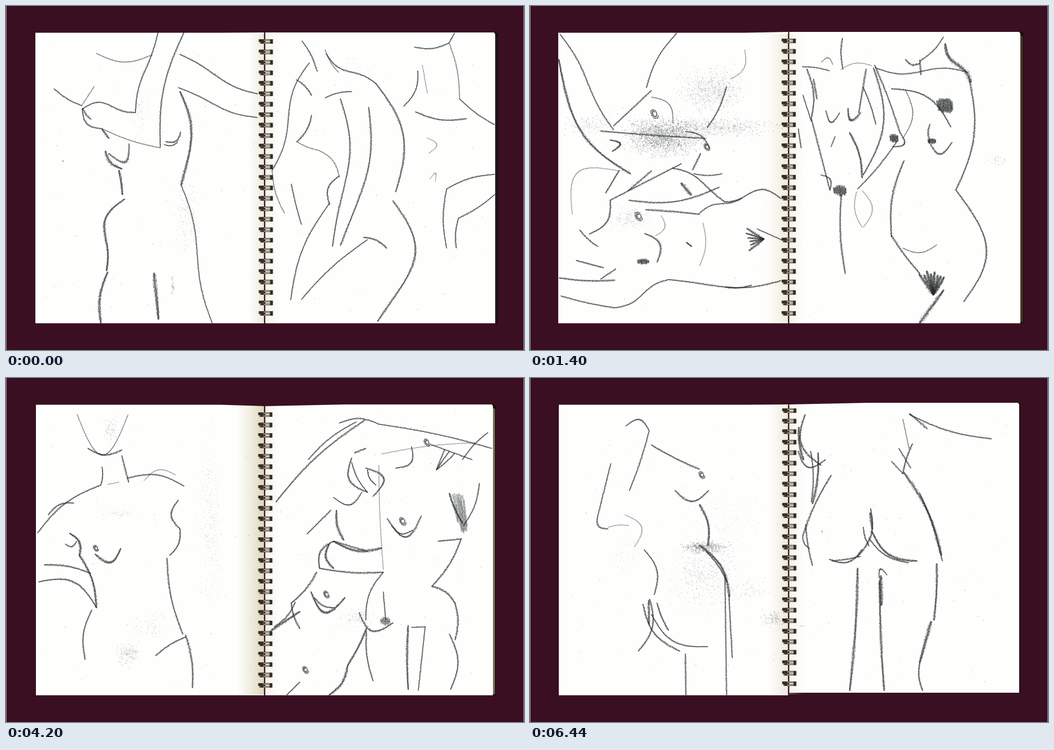
An HTML page with a canvas that plays this animation: 917x611 px, repeating every 7 s.

```html
<!DOCTYPE html>
<html lang="en">
<head>
<meta charset="utf-8">
<title>Sketchbook</title>
<style>
html, body { margin: 0; width: 100%; height: 100%; overflow: hidden; background: #3a0f22; }
canvas { display: block; width: 917px; height: 611px; }
</style>
</head>
<body>
<canvas id="stage" width="917" height="611"></canvas>
<script>
const W = 917, H = 611, HOLD = 1400, LOOP = 27;
const { PI, sin, cos, hypot } = Math;
let g, seed;

function rnd() {
  seed = (Math.imul(seed, 1664525) + 1013904223) >>> 0;
  return seed / 4294967296;
}
const spread = () => (rnd() + rnd() + rnd()) / 1.5 - 1;

// Points from one place to another: bow bulges clockwise, sway adds an S
function curve(x0, y0, x1, y1, bow = 0, sway = 0) {
  const dx = x1 - x0, dy = y1 - y0, len = hypot(dx, dy);
  const n = Math.ceil(len * 2 + Math.abs(bow) * 3);
  return Array.from({ length: n + 1 }, (_, i) => {
    const t = i / n, off = (bow * sin(PI * t) + sway * sin(2 * PI * t)) / len;
    return [x0 + dx * t - dy * off, y0 + dy * t + dx * off];
  });
}

// Pencil line: soft core with grain, pressure drifting along it
function pencil(pts, w, tone = 0.85) {
  const last = pts.length, phase = rnd() * 6;
  g.strokeStyle = g.fillStyle = "#2b3131";
  g.lineCap = g.lineJoin = "round";
  g.globalAlpha = tone * 0.55;
  g.lineWidth = w * 0.7;
  g.beginPath();
  pts.forEach(p => g.lineTo(...p));
  g.stroke();
  g.globalAlpha = tone * 0.5;
  pts.forEach(([x, y], i) => {
    const taper = Math.min(1, 0.4 + Math.min(i, last - i) / 24);
    const r = w * 0.65 * taper * (1 + 0.25 * sin(i / 35 + phase));
    for (let k = 0; k < w * 0.7; k++)
      g.fillRect(x + (rnd() * 2 - 1) * r - 0.45, y + (rnd() * 2 - 1) * r - 0.45, 0.9, 0.9);
  });
  g.globalAlpha = 1;
}

function arc(x0, y0, x1, y1, bow, w = 1.6, sway = 0) {
  pencil(curve(x0, y0, x1, y1, bow, sway), w, w < 1.3 ? 0.55 : 0.85);
}

// Small uneven spiral
function knot(x, y, r) {
  const pts = Array.from({ length: r * 14 }, (_, i) => {
    const a = i / r * 0.8, q = r * (1 - i / r / 22);
    return [x + q * 0.8 * cos(a), y + q * sin(a + 0.4)];
  });
  pencil(pts, 1.7, 0.75);
}

// Dark zigzag filling an ellipse
function scrub(x, y, rx, ry, tone = 0.7) {
  const n = Math.ceil(rx * 0.7), pts = [];
  for (let i = 0; i <= n; i++) {
    const u = i / n * 2 - 1, h = ry * (0.55 + 0.45 * cos(u * 1.5)) * (0.8 + rnd() * 0.4);
    const cx = x + u * rx, lean = h * 0.25;
    pts.push(...curve(cx - lean, y - h, cx + lean, y + h), ...curve(cx + lean, y + h, cx + 1, y - h));
  }
  pencil(pts, 2.2, tone);
}

// Strokes spreading from a point between two angles
function fan(x, y, r, from, to, n, w) {
  for (let i = 0; i < n; i++) {
    const a = (from + (to - from) * i / (n - 1)) * PI / 180, q = r * (0.75 + rnd() * 0.35);
    arc(x + q * cos(a), y + q * sin(a), x, y, spread() * 2, w);
  }
}

function grain(x, y, tone) {
  const s = 0.7 + rnd();
  g.globalAlpha = tone * (0.4 + rnd() * 0.6);
  g.fillRect(x, y, s, s);
}

function dust(x, y, rx, ry, n, tone = 0.3) {
  g.fillStyle = "#4a5150";
  for (let i = 0; i < n; i++) grain(x + spread() * rx, y + spread() * ry, tone);
  g.globalAlpha = 1;
}

// Clumpy graphite rubbed along a curve
function rub(x0, y0, x1, y1, bow, w, density) {
  g.fillStyle = "#59605c";
  curve(x0, y0, x1, y1, bow).forEach(([x, y], i) => {
    const d = density * (1 + 0.5 * sin(i / 17) * sin(i / 41));
    for (let k = rnd() + d; k >= 1; k--) grain(x + spread() * w, y + spread() * w, 0.45);
  });
  g.globalAlpha = 1;
}

function specks(n) {
  for (let i = 0; i < n; i++) dust(65 + rnd() * 780, 60 + rnd() * 490, 2, 2, 1, 0.35);
}

function poly(color, ...xy) {
  g.fillStyle = color;
  g.beginPath();
  for (let i = 0; i < xy.length; i += 2) g.lineTo(xy[i], xy[i + 1]);
  g.fill();
}

function shade(x0, x1, color) {
  const s = g.createLinearGradient(x0, 0, x1, 0);
  s.addColorStop(0, "rgba(225,218,190,0)");
  s.addColorStop(1, color);
  g.fillStyle = s;
  g.fillRect(Math.min(x0, x1), 50, Math.abs(x1 - x0), 512);
}

function book({ left = 52, right, edge, fold = 47, top = 47, foot = 563.5, tint, dark = 0.45, gutter = 28 }) {
  poly("#17100f", right - 2, top, edge - 2, top, edge, top + 3, edge, foot, right - 2, foot);
  poly(tint, right, top + 6, edge - 1.5, top + 8, edge - 1.5, foot - 2, right, foot - 2);
  poly("#fefefd", left, 47.5, 380, 47.5, 457, fold, 457, 563.5, left, 563.5);
  poly("#fefefd", 459, fold, 600, top, right - 2, top, right, top + 3, right, foot, 459, foot);
  shade(457 - gutter, 457, `rgba(216,207,174,${dark})`);
  shade(484, 459, "rgba(224,216,188,.3)");
}

function coils(x, y0, y1) {
  const bar = (color, dx, y, w, h) => { g.fillStyle = color; g.fillRect(x + dx, y, w, h); };
  bar("#3a1722", 456.7 - x, 49, 2, 514);
  for (let i = 0; i < LOOP; i++) {
    const y = y0 + (y1 - y0) * i / (LOOP - 1);
    bar("#2f2b24", 0, y - 4, 10, 5);
    bar("#6e6853", 2, y + 1, 8, 3);
    bar("#2f2b24", 20, y - 4, 5, 8);
    for (const dy of [-2.5, 2.5]) {
      bar("#37322a", 4, y + dy - 1.5, 19, 3);
      bar("#cfc8ae", 9, y + dy - 0.6, 11, 1.3);
    }
  }
}

function standing() {
  book({ right: 866, edge: 871, tint: "#21191b" });
  // raised arms
  arc(160, 84, 258, 87, 14, 1.4);
  arc(269, 47, 229, 189, 4, 1.8, -3);
  arc(229, 189, 135, 183, 10, 1.8, -6);
  arc(315, 47, 273, 251, 15, 1.8);
  arc(135, 182, 170, 218, 13);
  arc(170, 218, 273, 252, 4, 1.4);
  arc(85, 147, 134, 177, 3);
  arc(134, 177, 156, 143, 0, 1.3);
  arc(136, 182, 150, 201, 2, 2.4);
  arc(308, 86, 445, 156, 5, 2, -3.5);
  arc(305, 145, 445, 198, 6, 1.6, -3);
  // torso
  arc(308, 152, 310, 318, -19, 3.4, -2);
  arc(310, 318, 365, 563, -1, 1.5, -6);
  arc(283, 241, 309, 224, 9, 2.4);
  arc(280, 246, 304, 242, 4);
  arc(170, 219, 182, 235, 0, 3);
  arc(176, 258, 205, 289, 7, 3.6);
  arc(182, 262, 218, 245, 26, 2.6);
  arc(200, 292, 206, 335, -1, 3.8);
  arc(210, 343, 178, 470, 20, 3, 8);
  arc(180, 473, 168, 563, 8, 3.6);
  arc(262, 475, 270, 556, 0, 4.6);
  dust(294, 495, 4, 25, 60);
  dust(320, 375, 30, 80, 220, 0.22);
  dust(235, 180, 25, 60, 100, 0.2);
  dust(100, 275, 1.5, 1.5, 14);

  // seated back
  arc(524, 62, 551, 116, -3);
  arc(565, 78, 589, 118, 3, 1.3);
  arc(567, 85, 655, 138, 6, 2, 5);
  arc(655, 138, 690, 330, -31, 2.6);
  arc(537, 101, 471, 292, 4, 1.5, 8);
  arc(471, 292, 493, 368, 5, 1.4);
  arc(514, 131, 541, 159, -3, 2);
  arc(565, 163, 612, 152, -3);
  arc(592, 165, 578, 427, -19, 2, -6);
  arc(642, 180, 592, 425, -20, 2.4, -3);
  arc(541, 194, 515, 241, -5, 2.2);
  arc(515, 241, 552, 256, 2, 1.4);
  arc(553, 256, 590, 304, -9, 1.4);
  arc(590, 302, 573, 353, 12, 2);
  arc(505, 316, 523, 388, 1);
  arc(573, 350, 504, 522, 14, 1.5);
  arc(523, 521, 640, 415, -6);
  arc(633, 411, 674, 430, -5, 2.6);
  arc(685, 346, 658, 560, -49, 2.8, -7);
  // neck and knee studies
  arc(723, 73, 784, 66, 6);
  arc(784, 66, 794, 48);
  arc(785, 67, 803, 165, -5, 1.4);
  arc(803, 165, 865, 211, 3, 1.5);
  arc(729, 115, 704, 178, -9);
  arc(737, 105, 746, 155, 0, 1.2);
  arc(725, 188, 815, 200, 8, 2);
  arc(745, 234, 748, 262, -16, 1);
  arc(750, 308, 760, 312, -14, 1);
  arc(865, 299, 780, 325, 6);
  arc(780, 325, 780, 430, 6);
  arc(865, 335, 801, 377, -3);
  arc(801, 377, 797, 430, 3, 1.8);
  specks(130);
  coils(447.5, 63, 546);
}

function reclining() {
  book({ left: 50, right: 868, edge: 874, tint: "#4a3527", fold: 46, top: 46, gutter: 40 });
  dust(235, 232, 90, 45, 2400, 0.42);
  dust(320, 150, 75, 55, 900);
  dust(330, 215, 140, 22, 800, 0.35);
  dust(105, 210, 60, 25, 250, 0.25);
  dust(180, 375, 55, 30, 300, 0.2);
  // upper figure
  arc(53, 50, 148, 220, -1, 1.9, -4);
  arc(51, 95, 178, 298, 34, 3, -2);
  arc(260, 48, 206, 145, 8);
  arc(148, 213, 215, 150, 0, 2.2);
  arc(215, 162, 253, 208, -16, 1.4);
  knot(220, 191, 9);
  arc(380, 78, 355, 130, -13, 1.2);
  arc(348, 143, 314, 216, -4, 2.2);
  arc(125, 222, 310, 235, 1, 2.4);
  arc(275, 223, 318, 252, -9);
  knot(313, 250, 7);
  arc(142, 238, 146, 258, -16, 3);
  arc(302, 262, 288, 291, 0, 2.8);
  // lower figure
  arc(75, 370, 158, 293, -48, 1.2);
  arc(158, 292, 134, 332, 0, 2.7);
  arc(174, 328, 215, 293, 0, 2.6);
  arc(268, 280, 142, 345, 0, 2.2);
  arc(142, 345, 105, 405, -15, 2.2);
  arc(252, 288, 345, 348, -8, 2.2, -3);
  arc(268, 315, 285, 335, 0, 5);
  arc(175, 345, 335, 322, 14, 2.2);
  arc(290, 298, 340, 298, 3);
  arc(300, 368, 380, 338, -2, 1.8, -4);
  arc(380, 338, 444, 342, -14, 1.8);
  arc(345, 348, 375, 341, 2, 2.6);
  arc(205, 362, 300, 370, -1, 2.7);
  knot(192, 373, 9);
  arc(232, 372, 222, 408, -12, 1.2);
  arc(88, 398, 120, 427, 2, 2);
  arc(203, 404, 225, 455, -17, 2.6);
  scrub(200, 454, 9, 4);
  arc(306, 385, 300, 462, -8, 1.1);
  arc(277, 420, 286, 427, 0, 3.2);
  arc(82, 452, 130, 465, 0, 2.6);
  arc(52, 483, 150, 487, 3, 2.6);
  arc(125, 485, 152, 467, 0, 2);
  arc(55, 515, 150, 536, 2, 1.9);
  arc(150, 536, 245, 486, 2, 1.9, 5);
  arc(245, 486, 444, 488, 12, 1.9, -3);
  arc(345, 499, 392, 496, 3, 2.4);
  fan(414, 414, 33, 142, 212, 6, 3.2);
  arc(402, 396, 447, 416);

  // front view
  arc(482, 108, 530, 115, -2);
  arc(553, 57, 554, 112, 3, 2);
  arc(516, 100, 536, 104, -10, 1.3);
  arc(550, 113, 605, 106, -8, 1.2);
  arc(490, 112, 498, 200, -8, 2.4);
  arc(498, 200, 531, 327, 0, 2.2);
  arc(483, 158, 498, 205);
  arc(475, 218, 480, 252, 0, 2);
  arc(502, 130, 508, 165, 0, 2.8);
  arc(595, 112, 582, 190, 0, 2.6);
  arc(590, 145, 612, 210, -2, 2);
  arc(608, 110, 590, 300, -27, 2.4);
  arc(524, 186, 548, 190, 19, 2.2);
  arc(563, 182, 585, 190, 18, 3);
  arc(566, 225, 588, 305, -6, 3);
  arc(540, 232, 533, 250);
  scrub(548, 328, 10, 9);
  arc(551, 335, 558, 475, 5, 2.6);
  arc(578, 330, 588, 393, 8, 1.2);
  arc(588, 328, 590, 393, -17, 1.2);
  arc(580, 325, 650, 240, 3, 1.8);
  arc(515, 300, 531, 327, -10);
  // side view
  arc(665, 95, 690, 102, 6, 2.6);
  arc(690, 96, 692, 122, 0, 2.4);
  arc(690, 98, 732, 55, 4);
  arc(735, 68, 780, 135, 3, 5.5, 5);
  arc(612, 110, 775, 118, 2, 1.8, 7);
  arc(640, 147, 745, 215, -22, 2.2);
  scrub(734, 177, 12, 13);
  arc(778, 130, 754, 327, -20, 2.4);
  arc(754, 327, 768, 525, -46, 2.2, 3);
  arc(610, 105, 655, 225, -2, 2.2);
  scrub(644, 235, 6, 7);
  arc(655, 225, 642, 250, -16, 2.2);
  arc(665, 150, 660, 235, -15, 1.4);
  arc(706, 240, 747, 242, 22, 2.4);
  arc(708, 210, 708, 240, 3, 2.4);
  scrub(711, 240, 6, 4);
  arc(662, 275, 640, 410, 10, 2.8);
  arc(640, 408, 690, 475, 2, 2.8);
  arc(660, 430, 720, 424, 11, 1.4);
  fan(714, 512, 41, 235, 302, 8, 5);
  arc(732, 505, 690, 563, 0, 4.5);
  dust(830, 275, 30, 12, 40);
  specks(60);
  coils(445.5, 62, 546);
}

function rubbed() {
  book({ right: 867, edge: 873, tint: "#57402c", fold: 48 });
  rub(245, 95, 440, 95, -22, 26, 4);
  rub(235, 110, 248, 430, 14, 22, 3);
  rub(410, 115, 352, 215, 22, 18, 4);
  rub(250, 150, 345, 155, 38, 18, 3);
  rub(350, 150, 350, 240, -10, 13, 3);
  rub(368, 230, 365, 450, -22, 15, 4);
  rub(262, 250, 365, 255, 28, 16, 3);
  rub(296, 300, 356, 296, 20, 10, 8);
  rub(318, 320, 326, 500, 2, 12, 4);
  rub(318, 490, 328, 540, 0, 22, 4);
  dust(310, 280, 100, 250, 1300, 0.2);
  scrub(259, 222, 23, 35, 0.4);
  scrub(183, 255, 20, 34, 0.4);
  // crouched figure
  arc(148, 232, 268, 240, -5, 2.2);
  arc(185, 246, 268, 248, 0, 2.2);
  arc(148, 232, 98, 325, -5, 2.6);
  arc(152, 236, 118, 318, -8, 1.8);
  arc(140, 272, 110, 307, 33, 2.4);
  arc(158, 236, 190, 298, 5, 2.2);
  arc(98, 308, 190, 298, -13, 2.4);
  arc(190, 298, 180, 337, -11, 2.6);
  arc(182, 337, 75, 335, -15, 2.6);
  arc(125, 290, 185, 298, -6, 2.8);
  scrub(67, 339, 10, 12, 0.95);
  arc(72, 325, 102, 322, -13);
  arc(112, 315, 134, 328);
  // small bent figure
  arc(90, 435, 215, 460, -30, 1.4);
  arc(95, 447, 207, 460, -26, 1.4);
  arc(100, 450, 112, 507, 12, 1.4);
  arc(112, 507, 213, 485, 9, 1.4);
  arc(115, 485, 213, 480, 8, 1.4);
  arc(145, 463, 207, 458, 0, 1.4);
  scrub(159, 462, 6, 8, 0.95);
  for (let i = 0; i < 6; i++) knot(72 + i * 11, 467 + 9 * sin(i * 2.3), 5 + i % 3);
  arc(180, 420, 225, 442, 0, 1.1);

  // lying figure
  arc(540, 172, 505, 150, -17, 3);
  arc(505, 150, 610, 97, 4, 3);
  arc(610, 97, 637, 105, -6, 3);
  arc(637, 105, 545, 172, -5, 3.4);
  arc(520, 140, 618, 104, 6, 1.5);
  arc(506, 155, 508, 196, -4, 2.4);
  arc(545, 172, 645, 160, -21, 2.6);
  scrub(577, 159, 28, 8, 0.3);
  arc(645, 160, 715, 152, -18, 2.6);
  arc(715, 152, 865, 165, 2, 2.6);
  arc(683, 170, 725, 152, -4, 2.4);
  arc(690, 168, 714, 170, -4, 2);
  arc(478, 132, 480, 190, -9, 2.4);
  arc(480, 178, 502, 178, 0, 4);
  arc(478, 207, 665, 232, 13, 2.8);
  arc(527, 222, 535, 185, 0, 3);
  arc(535, 185, 548, 205, 0, 2.4);
  arc(535, 207, 642, 195, 21, 3);
  arc(650, 165, 635, 225, -12, 1.2);
  arc(755, 208, 858, 203, 6, 2.4);
  arc(478, 240, 495, 220, 8);
  for (let i = 0; i < 24; i++) {
    const x = 658 + i * 4, y = 222 - i * 0.7;
    arc(x, y + spread() * 4, x + 20 + rnd() * 12, y + 34 + rnd() * 24 - i * 0.4, 0, 4.5);
  }
  // lower outline
  arc(472, 447, 487, 413, 14, 1.2);
  arc(487, 413, 635, 337, 0, 1.2, 6);
  arc(533, 427, 622, 348, -2, 2.2);
  arc(575, 385, 690, 390, -14, 2.2, 3);
  arc(690, 390, 752, 391, 0, 2);
  arc(570, 388, 582, 388, 0, 4);
  arc(478, 485, 620, 480, 13, 2.6);
  arc(620, 480, 738, 455, 17, 2.4);
  arc(500, 494, 595, 489, 6, 1.2);
  arc(732, 449, 820, 451, 0, 1.8);
  dust(520, 275, 2, 2, 16);
  specks(70);
  coils(445.5, 63, 547);
}

function embracing() {
  book({ left: 53, right: 862, edge: 867, tint: "#81705a", fold: 50, dark: 0.85, gutter: 48 });
  // head and shoulders
  arc(126, 65, 216, 65, 72, 1.3);
  arc(145, 125, 205, 128, 10, 2.2);
  arc(170, 158, 168, 190, -2, 1.8);
  arc(168, 190, 56, 275, 12, 1.8);
  arc(205, 138, 217, 185, 0, 2.2);
  arc(215, 178, 315, 192, -13);
  arc(245, 182, 300, 172, -14, 1.2);
  arc(180, 189, 200, 185, 0, 1.2);
  arc(75, 243, 120, 222, -8, 2);
  // torso
  arc(113, 276, 130, 315, -9, 3.4);
  arc(105, 295, 125, 290, 7);
  arc(130, 315, 160, 408, -8, 3);
  arc(68, 332, 150, 347, -5, 2.6);
  arc(58, 362, 160, 408, -25, 2.2);
  arc(158, 313, 203, 303, 20, 3);
  knot(159, 302, 6);
  arc(152, 412, 140, 500, 9, 1.9);
  arc(305, 217, 308, 268, 14, 2.2);
  arc(308, 268, 290, 315, -7, 2.2);
  arc(285, 320, 313, 455, 7, 2.2);
  arc(318, 457, 330, 550, -5, 2.8);
  arc(265, 493, 318, 460, -3, 2.2);
  dust(215, 490, 28, 28, 200);
  dust(255, 440, 45, 40, 100, 0.2);
  dust(185, 90, 20, 30, 90);
  dust(200, 240, 40, 10, 60, 0.2);
  dust(360, 260, 30, 190, 380, 0.2);

  // raised arms
  arc(478, 220, 635, 75, -10, 2.4);
  arc(535, 145, 620, 78, -6);
  arc(590, 80, 660, 82, -9);
  arc(660, 82, 860, 125, -4);
  knot(745, 114, 7);
  arc(665, 135, 830, 115, -4, 1.1);
  arc(752, 118, 825, 145);
  arc(853, 97, 808, 145, 3);
  fan(762, 163, 50, 292, 318, 3, 1.9);
  arc(718, 122, 690, 160, -16, 1.8);
  // hair and neck
  arc(617, 133, 637, 125, 0, 2.6);
  arc(612, 142, 640, 203, 20, 2.4);
  arc(640, 203, 612, 150, -4);
  arc(637, 160, 650, 210, -26, 2.6);
  arc(655, 190, 640, 163, -4, 2);
  arc(580, 212, 630, 203, 18);
  arc(575, 235, 533, 277, 0, 2);
  arc(585, 235, 598, 288, 5, 3);
  arc(660, 155, 668, 340, 2, 1.2);
  // right figure
  arc(675, 250, 735, 245, 35, 2.5);
  arc(683, 262, 720, 270, 11);
  knot(702, 254, 8);
  arc(838, 187, 810, 262, -6);
  arc(785, 205, 808, 258, 2, 3.2);
  scrub(803, 240, 7, 34, 0.35);
  arc(765, 290, 805, 286, 0, 2.4);
  arc(806, 285, 754, 370, -6, 2.4);
  arc(754, 370, 795, 400, -6, 2.8);
  arc(795, 400, 795, 465, -5, 2.4);
  arc(785, 455, 787, 553, -14, 2);
  arc(668, 345, 637, 430, 10);
  arc(625, 417, 685, 435, 24, 2.7);
  arc(668, 380, 672, 430);
  scrub(671, 432, 7, 7, 0.45);
  arc(638, 450, 650, 538, 5, 2);
  arc(712, 440, 712, 553, 2, 3);
  arc(718, 443, 742, 442);
  arc(742, 442, 730, 555, 0, 1.5);
  // left figure
  arc(555, 338, 580, 290, -12, 2.8);
  arc(580, 290, 665, 302, 11, 3.4);
  arc(580, 290, 640, 308, 0, 2.4);
  arc(668, 345, 555, 338, -4, 2.6);
  arc(572, 295, 580, 338, 10, 3);
  arc(540, 380, 600, 390, 32, 3);
  arc(546, 390, 582, 408, 6, 2);
  knot(567, 384, 7);
  arc(550, 345, 505, 400, -4, 2.8);
  arc(505, 400, 520, 445, 3, 2.6);
  arc(470, 448, 520, 415, 0, 4);
  arc(475, 442, 512, 398, 5, 2.2);
  arc(638, 445, 605, 510, -2, 3);
  arc(605, 510, 572, 563, -8, 3);
  knot(530, 518, 7);
  arc(497, 563, 520, 540, 0, 2);
  dust(620, 425, 35, 20, 90);
  specks(130);
  coils(446.5, 65, 546);
}

function turned() {
  book({ left: 51, right: 866, edge: 868, tint: "#2a1b1d", fold: 47, top: 44, foot: 559, gutter: 36 });
  // raised arm
  arc(170, 85, 211, 94, -16, 1.8);
  arc(211, 94, 176, 200, -2, 1.8);
  arc(143, 152, 120, 245, 0, 1.8);
  arc(120, 245, 138, 268, 10, 1.8);
  arc(138, 265, 175, 262, -2, 1.1);
  arc(168, 243, 185, 300, -22, 1.2);
  // side view
  arc(215, 119, 300, 162, 2, 2.6);
  knot(304, 172, 7);
  arc(257, 200, 316, 200, 19, 2.4);
  arc(300, 225, 315, 297, -8, 3.4);
  arc(202, 305, 220, 385, -14, 1.8);
  arc(300, 297, 353, 388, -14, 3.6);
  arc(312, 308, 349, 362, -3, 2);
  arc(345, 350, 348, 563, 0, 1.8);
  arc(352, 385, 358, 497, 0, 2);
  arc(212, 393, 192, 485, -15, 2.2);
  arc(210, 395, 211, 438, 0, 3);
  arc(200, 402, 265, 485, 16, 2.4);
  arc(215, 420, 315, 477, 22);
  arc(225, 400, 245, 448, 2, 2.8);
  arc(275, 490, 276, 563, 0, 2.2);
  dust(310, 300, 55, 15, 600, 0.4);
  dust(310, 350, 85, 80, 700, 0.25);
  dust(430, 428, 28, 20, 150, 0.35);
  dust(390, 375, 45, 30, 80);
  dust(340, 250, 90, 60, 120, 0.2);
  dust(170, 310, 40, 40, 60, 0.2);

  // arms seen from behind
  arc(487, 65, 515, 155, 22, 2.8);
  arc(476, 88, 484, 145, 3, 4);
  arc(475, 130, 523, 145, 22, 2.4);
  arc(510, 133, 500, 223, -4, 3.2);
  arc(497, 130, 498, 220, -4, 1.8);
  arc(533, 173, 483, 280, 4, 2.6);
  arc(483, 280, 495, 303, 4);
  arc(488, 260, 500, 333, 2, 2.2);
  arc(660, 73, 671, 125, 0, 1.3);
  arc(672, 65, 817, 108, 8, 1.9);
  arc(672, 63, 703, 90, 0, 2.8);
  arc(677, 117, 660, 170, 2, 2.6);
  arc(653, 125, 674, 160, 0, 1.8);
  arc(640, 148, 660, 170);
  // hips and legs
  arc(662, 168, 728, 315, -10, 3.8);
  arc(690, 205, 730, 325, -4, 2);
  arc(720, 330, 715, 430, -2, 3);
  arc(710, 433, 690, 505, 0, 4.4);
  arc(690, 505, 695, 555, 4, 2.6);
  arc(603, 232, 580, 317, -13, 2.4);
  arc(602, 240, 606, 268, 0, 3.6);
  arc(590, 265, 600, 298, 2, 2);
  arc(605, 272, 685, 325, 18, 3);
  arc(600, 285, 670, 328, 10, 2);
  arc(530, 322, 588, 305, 14, 2.6);
  arc(535, 325, 585, 317, 1, 2.2);
  arc(580, 338, 566, 555, -3, 3.6);
  arc(621, 352, 622, 403, 0, 5);
  arc(618, 355, 632, 350, -14);
  arc(619, 360, 627, 555, 2, 3);
  dust(516, 272, 2, 2, 10);
  dust(482, 440, 8, 2, 12);
  specks(150);
  coils(446.5, 58, 543);
}

const spreads = [standing, reclining, rubbed, embracing, turned].map((draw, i) => {
  const sheet = document.createElement("canvas");
  sheet.width = W;
  sheet.height = H;
  g = sheet.getContext("2d");
  seed = 71 + i * 997;
  g.fillStyle = "#3a0f22";
  g.fillRect(0, 0, W, H);
  g.fillStyle = "#a3929a";
  for (const x of [0, W - 1]) g.fillRect(x, 0, 1, H);
  draw();
  return sheet;
});

const view = document.getElementById("stage").getContext("2d");
const start = performance.now();
let shown = -1;

function tick() {
  const i = Math.floor((performance.now() - start) / HOLD) % spreads.length;
  if (i !== shown) view.drawImage(spreads[shown = i], 0, 0);
  requestAnimationFrame(tick);
}
tick();
</script>
</body>
</html>
```
